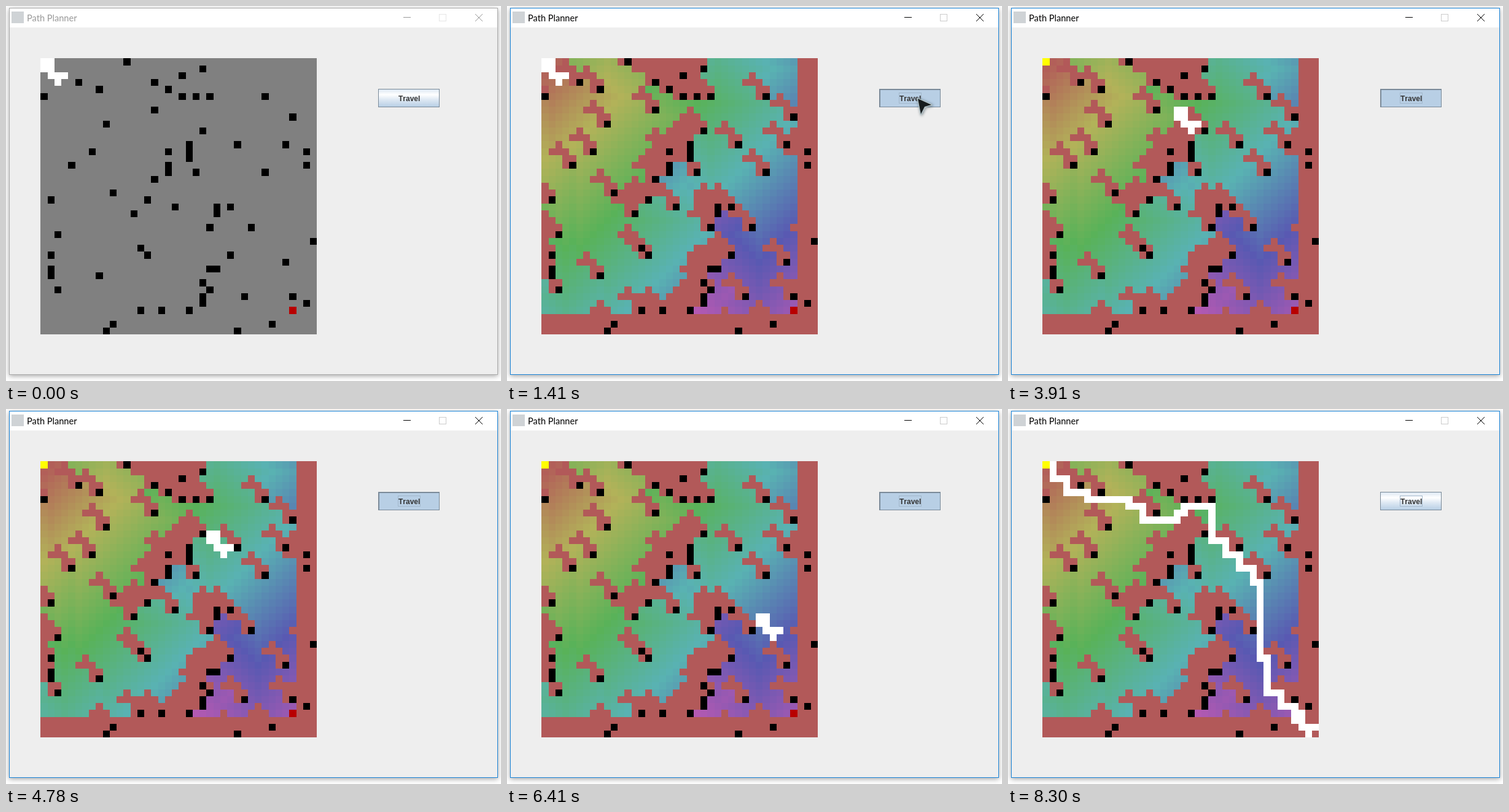
Recreate the animation shown at these times as an HTML page with a canvas. Size 806 px wide and 611 px high, loop 9.88 s.

```html
<!DOCTYPE html>
<html lang="en">
<head>
<meta charset="utf-8">
<title>Path Planner</title>
<style>
  html, body { margin: 0; width: 100%; height: 100%; overflow: hidden; background: #fff; }
  canvas { display: block; }
</style>
</head>
<body>
<canvas id="stage" width="806" height="611"></canvas>
<script>
const ctx = document.getElementById('stage').getContext('2d');
const LOOP = 9880, SIZE = 40, CELL = 11.25, LEFT = 56, TOP = 85;
const PRESS = 1200, PLANNED = 1300, DEPART = 1415, STEP = 87.5, DONE = 8300;

// The level: obstacle columns of each grid row
const obstacles = [
  [12], [23], [20], [5, 16], [8, 18], [0, 20, 22, 24, 32], [], [16], [36], [9],
  [23], [], [21, 28, 35], [7, 18, 21, 38], [21], [4, 18, 38], [18, 22, 32], [16], [], [10],
  [1, 15], [19, 25, 27], [13, 25], [], [24, 30], [2], [39], [14], [1, 15, 27], [35],
  [1, 24, 25], [1, 8], [23], [2, 24], [23, 29, 36], [23, 38], [14, 17, 21], [], [10, 33], [9, 28]
];
const robot = [[0, 0], [1, 0], [0, 1], [1, 1], [1, 2], [2, 2], [3, 2], [2, 3]];
const goal = [36, 36];

const clamp = v => Math.min(1, Math.max(0, v));
const neighbours = (x, y) => [[x, y - 1], [x, y + 1], [x - 1, y], [x + 1, y]];

// A position is blocked when any part of the robot would hit something there
const solid = (x, y) => x < 0 || y < 0 || x >= SIZE || y >= SIZE || obstacles[y].includes(x);
const blocked = (x, y) => robot.some(([dx, dy]) => solid(x + dx, y + dy));

function floodFill() {
  const dist = Array.from({ length: SIZE }, () => Array(SIZE).fill(-1));
  const queue = [[0, 0]];
  dist[0][0] = 0;
  for (const [x, y] of queue) {
    for (const [nx, ny] of neighbours(x, y)) {
      if (blocked(nx, ny) || dist[ny][nx] >= 0) continue;
      dist[ny][nx] = dist[y][x] + 1;
      queue.push([nx, ny]);
    }
  }
  return dist;
}

// Walk downhill from the goal, vertical moves first
function tracePath(dist) {
  const path = [goal];
  for (let d = dist[goal[1]][goal[0]] - 1; d >= 0; d--) {
    path.unshift(neighbours(...path[0]).find(([x, y]) => dist[y]?.[x] === d));
  }
  return path;
}

const dist = floodFill();
const path = tracePath(dist);

function rect(x, y, w, h, color) {
  ctx.fillStyle = color;
  ctx.fillRect(x, y, w, h);
}

function outline(x, y, w, h, color) {
  ctx.strokeStyle = color;
  ctx.lineWidth = 1;
  ctx.strokeRect(x + .5, y + .5, w - 1, h - 1);
}

function line(x1, y1, x2, y2, color) {
  ctx.beginPath();
  ctx.moveTo(x1, y1);
  ctx.lineTo(x2, y2);
  ctx.strokeStyle = color;
  ctx.lineWidth = 1;
  ctx.stroke();
}

function text(str, x, y, font, color) {
  ctx.font = font;
  ctx.fillStyle = color;
  ctx.fillText(str, x, y);
}

function cell(x, y, color) {
  const px = Math.ceil(LEFT + x * CELL), py = Math.ceil(TOP + y * CELL);
  rect(px, py, Math.ceil(LEFT + (x + 1) * CELL) - px, Math.ceil(TOP + (y + 1) * CELL) - py, color);
}

function drawWindow(active) {
  rect(0, 0, 806, 611, '#fff');
  ctx.save();
  ctx.shadowColor = 'rgba(0,0,0,.35)';
  ctx.shadowBlur = 8;
  ctx.shadowOffsetY = 2;
  rect(5, 3, 796, 598, '#fff');
  ctx.restore();
  rect(6, 35, 794, 565, '#eee');
  outline(5, 3, 796, 598, active ? '#1883d7' : '#aaa');

  rect(9, 9, 20, 19, '#cfd3d6');
  const ink = active ? '#000' : '#999';
  text('Path Planner', 34, 25, '14.6px Lato, sans-serif', ink);
  rect(647, 18, 12, 1, ink);
  outline(705, 13, 12, 12, active ? '#ccc' : '#e6e6e6');
  line(764, 13, 776, 25, ink);
  line(776, 13, 764, 25, ink);
}

function drawButton(pressed, focused) {
  const edge = '#7a8a99';
  if (pressed) {
    rect(606, 135, 100, 30, edge);
    rect(608, 137, 97, 27, '#b8cfe5');
  } else {
    const shade = ctx.createLinearGradient(0, 136, 0, 164);
    shade.addColorStop(0, '#dde8f3');
    shade.addColorStop(.3, '#fff');
    shade.addColorStop(.6, '#dde8f3');
    shade.addColorStop(1, '#b8cfe5');
    rect(606, 135, 100, 30, shade);
    outline(606, 135, 100, 30, edge);
  }
  if (focused) outline(638, 141, 37, 18, '#a3b8cc');
  ctx.fontKerning = 'none';
  text('Travel', 639, 155, 'bold 12px "Liberation Sans", Arial, sans-serif', '#333');
  ctx.fontKerning = 'auto';
}

function drawGrid(t) {
  for (let y = 0; y < SIZE; y++) {
    for (let x = 0; x < SIZE; x++) {
      const hue = Math.max(0, dist[y][x]) / 96 * 360;
      cell(x, y, solid(x, y) ? '#000' : t < PLANNED ? '#808080' : `hsl(${hue} 36.84% 52.5%)`);
    }
  }
  if (t >= DONE) path.forEach(([x, y]) => cell(x, y, '#fff'));
  cell(0, 0, '#ff0');
  cell(...goal, '#b80000');
  const last = path.length - 1;
  const [rx, ry] = path[Math.floor(clamp((t - DEPART) / STEP / last) * last)];
  robot.forEach(([dx, dy]) => cell(rx + dx, ry + dy, '#fff'));
}

// The pointer glides in from the right edge, clicks, and glides out again
function drawPointer(t) {
  const away = 1 - clamp((t - 640) / 410) + clamp((t - 1720) / 330);
  if (away >= 1) return;
  ctx.save();
  ctx.translate(668 + 140 * away, 149 + 30 * away);
  ctx.beginPath();
  ctx.moveTo(1, 2);
  ctx.lineTo(23, 12);
  ctx.lineTo(12, 15);
  ctx.lineTo(6, 27);
  ctx.closePath();
  ctx.lineJoin = 'round';
  ctx.lineWidth = 3;
  ctx.strokeStyle = '#b4c4c8';
  ctx.shadowColor = 'rgba(40,60,70,.6)';
  ctx.shadowBlur = 4;
  ctx.shadowOffsetX = ctx.shadowOffsetY = 1;
  ctx.stroke();
  ctx.shadowColor = 'transparent';
  ctx.fillStyle = '#161c1e';
  ctx.fill();
  ctx.restore();
}

let start;
function frame(now) {
  start ??= now;
  const t = (now - start) % LOOP;
  const active = t >= PRESS;
  drawWindow(active);
  drawButton(active && t < DONE, active);
  drawGrid(t);
  drawPointer(t);
  requestAnimationFrame(frame);
}
requestAnimationFrame(frame);
</script>
</body>
</html>
```
